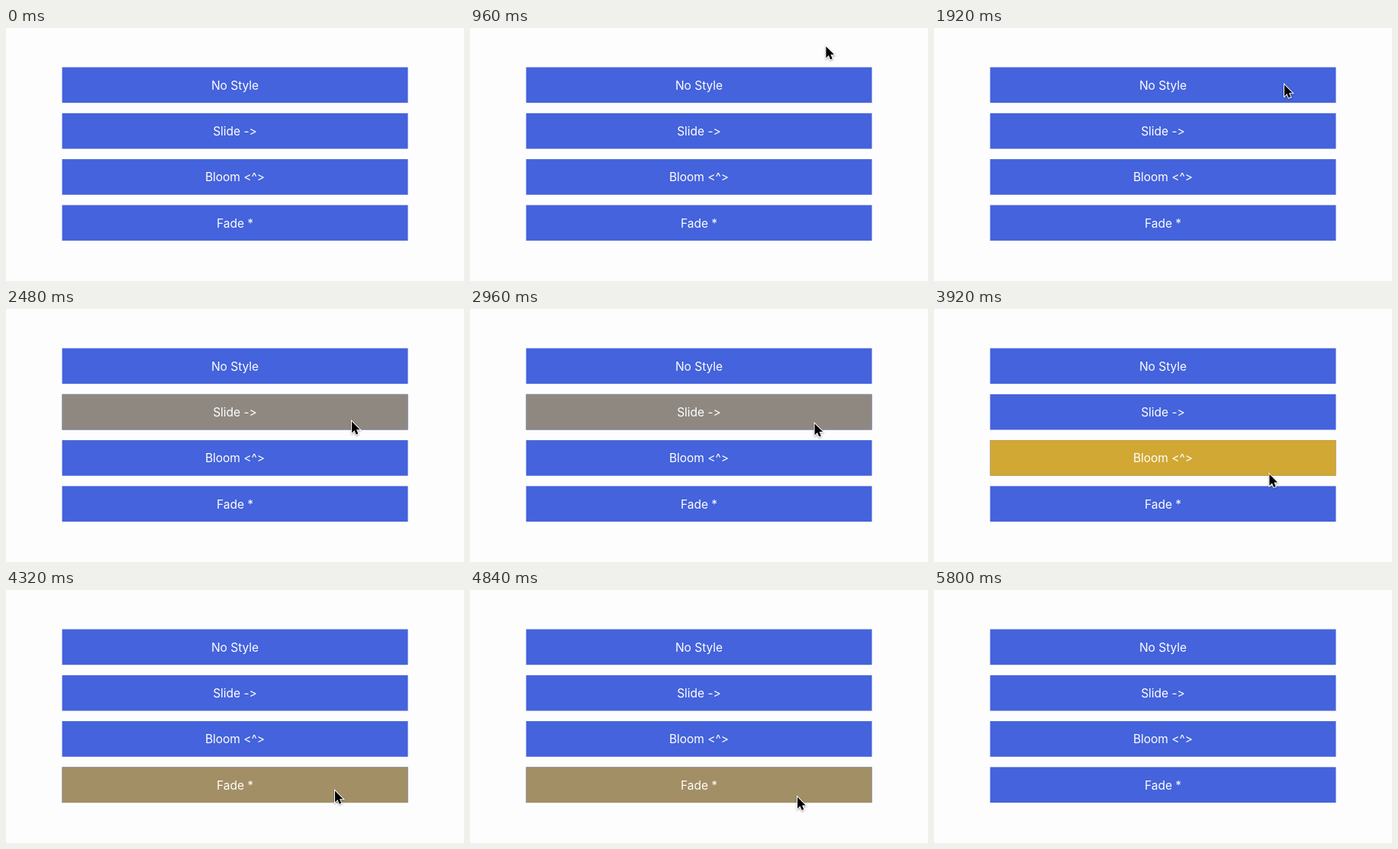
Recreate the animation shown at these times as an HTML page. Size 600 by 332 pixels, loop 6.48 s.

```html
<!DOCTYPE html>
<html lang="en">
<head>
<meta charset="utf-8">
<title>Button hover styles</title>
<style>
  html, body { margin: 0; width: 100%; height: 100%; overflow: hidden; background: #fdfdfe; }
  svg { display: block; }
  text {
    font: 15.5px Inter, "Open Sans", sans-serif;
    font-feature-settings: "calt" 0, "liga" 0;
    fill: #fff;
    text-anchor: middle;
  }
  #cursor { filter: drop-shadow(0 1px 1px rgba(0, 0, 0, .35)); }
</style>
</head>
<body>
<svg id="stage" width="600" height="332" viewBox="0 0 600 332">
  <g id="buttons"></g>
  <g id="cursor">
    <path d="M1 1.5V16.5L4.5 13.2L6.7 18.7L9.3 17.6L7 12.2H11.6Z"
      fill="#000" stroke="#fff" stroke-width="2" paint-order="stroke"/>
  </g>
</svg>
<script>
const LOOP = 6480, STEP = 40, FADE = 290;
const LEFT = 73.5, TOP = 51.5, WIDTH = 453, HEIGHT = 46.7, PITCH = 60.3;

// Hover colour, and the times at which the pointer enters and leaves.
const buttons = [
  { label: "No Style" },
  { label: "Slide ->", color: "#8e8881", enter: 2140, leave: 3000, style: "slide" },
  { label: "Bloom <^>", color: "#d1a834", enter: 3060, leave: 3920, style: "bloom" },
  { label: "Fade *", color: "#a38f65", enter: 3970, leave: 4840, style: "fade" }
];

// Pointer stops: time, x, y.
const stops = [
  [720, 472, -22], [1220, 458, 73], [1920, 458, 73], [2400, 452, 146],
  [2720, 452, 146], [2920, 451, 146.5], [3200, 443, 190], [3760, 443, 190],
  [4160, 430, 262], [4760, 430, 262], [5000, 412, 336]
];

const clamp = v => Math.min(1, Math.max(0, v));
const smooth = t => t * t * (3 - 2 * t);
const easeOut = t => 1 - (1 - t) ** 2;

function add(parent, tag, attrs) {
  const el = document.createElementNS("http://www.w3.org/2000/svg", tag);
  for (const key in attrs) el.setAttribute(key, attrs[key]);
  return parent.appendChild(el);
}

const group = document.getElementById("buttons");
const cursor = document.getElementById("cursor");

buttons.forEach((b, i) => {
  b.y = TOP + i * PITCH;
  const box = { x: LEFT, y: b.y, width: WIDTH, height: HEIGHT };
  add(group, "rect", { ...box, fill: "#4463dc" });
  if (b.style) b.cover = add(group, "rect", { ...box, fill: b.color });
  add(group, "text", { x: 300, y: b.y + 29.2 }).textContent = b.label;
});

function drawCover(b, time) {
  const amount = easeOut(clamp((time - b.enter) / FADE)) - easeOut(clamp((time - b.leave) / FADE));
  const set = (key, value) => b.cover.setAttribute(key, value);
  if (b.style === "fade") return set("opacity", amount);
  set("width", WIDTH * amount);
  if (b.style === "bloom") {
    set("x", LEFT + WIDTH * (1 - amount) / 2);
    set("y", b.y + HEIGHT * (1 - amount) / 2);
    set("height", HEIGHT * amount);
  }
}

function drawCursor(time) {
  const next = stops.findIndex(s => s[0] > time);
  cursor.style.display = next > 0 ? "" : "none";
  if (next < 1) return;
  const from = stops[next - 1], to = stops[next];
  const t = (time - from[0]) / (to[0] - from[0]);
  // The last stretch accelerates out of the stage.
  const k = next === stops.length - 1 ? t * t : smooth(t);
  const at = i => from[i] + (to[i] - from[i]) * k;
  cursor.setAttribute("transform", `translate(${at(1)} ${at(2)})`);
}

const start = performance.now();
function frame() {
  const time = Math.floor((performance.now() - start) % LOOP / STEP) * STEP;
  buttons.forEach(b => b.cover && drawCover(b, time));
  drawCursor(time);
  requestAnimationFrame(frame);
}
frame();
</script>
</body>
</html>
```
